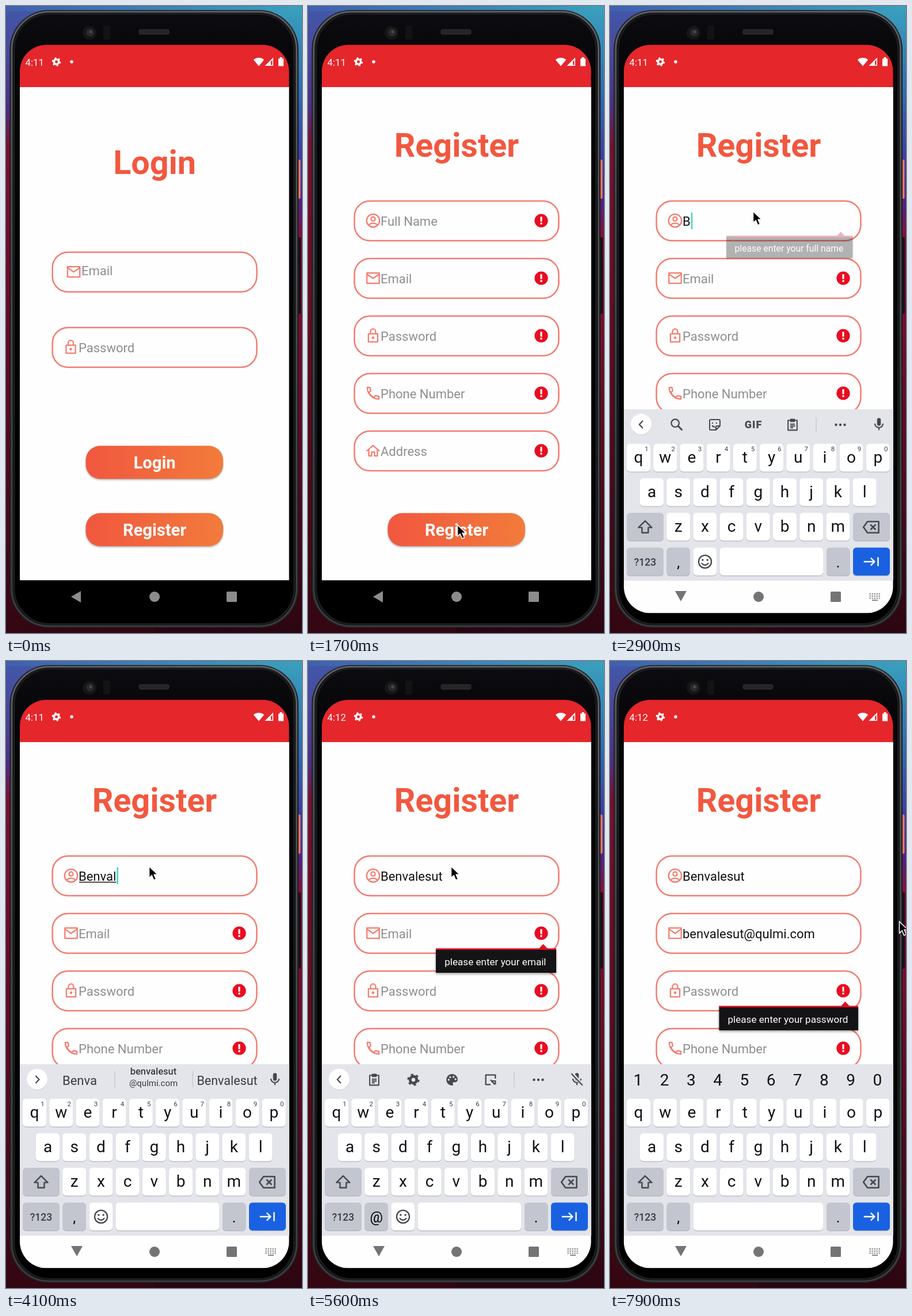
These frames come from a looping animation (514x1090 px, 8 s). An HTML page:

```html
<!DOCTYPE html>
<html lang="en">
<head>
<meta charset="utf-8">
<title>Sign-up walkthrough</title>
<style>
  html, body { margin: 0; width: 100%; height: 100%; overflow: hidden; background: #2e0710; }
  svg { display: block; width: 514px; height: 1090px; font-family: Roboto, Arial, sans-serif; }
  text { white-space: pre; }
  .mid { text-anchor: middle; }
  .title { font-size: 57.4px; font-weight: 700; fill: #f1583f; text-anchor: middle; }
  .btn text { font-size: 29.2px; font-weight: 700; fill: #fff; text-anchor: middle; }
  .btn rect { filter: drop-shadow(0 2px 1.5px rgba(0,0,0,.3)); }
  .btn.down rect { filter: drop-shadow(0 5px 3.5px rgba(0,0,0,.34)); }
  .field { font-size: 22px; }
  .hint { fill: #8e8e90; }
  .value { fill: #111; }
  .key { font-size: 28px; fill: #101114; text-anchor: middle; }
  .sup { font-size: 11.5px; fill: #3c3d42; text-anchor: middle; }
</style>
</head>
<body>
<svg id="stage" viewBox="0 0 514 1090"></svg>
<script>
const LOOP = 8000, STEP = 100;
const NAME = 'Benvalesut', HOST = '@qulmi.com', MAIL = NAME.toLowerCase() + HOST;
const CORAL = '#f17d70', INK = '#46484d', PANEL = '#e3e5ea', GREY_KEY = '#c3c5cf';

const rect = (x, y, w, h, r, fill, extra = '') =>
  `<rect x="${x}" y="${y}" width="${w}" height="${h}" rx="${r}" fill="${fill}" ${extra}/>`;
const dot = (x, y, r, fill = 'currentColor', extra = '') =>
  `<circle cx="${x}" cy="${y}" r="${r}" fill="${fill}" ${extra}/>`;
const path = (d, extra = '') => `<path d="${d}" ${extra}/>`;
const text = (x, y, s, cls = '', extra = '') => `<text x="${x}" y="${y}" class="${cls}" ${extra}>${s}</text>`;
const group = (id, body, extra = '') => `<g id="${id}" ${extra}>${body}</g>`;
const line = (x, y1, y2) => path(`M${x} ${y1}V${y2}`, 'stroke="#c4c6cc" stroke-width="1.3"');
const gradient = (id, dir, stops) => `<linearGradient id="${id}" ${dir}>` +
  stops.map(([o, c]) => `<stop offset="${o}" stop-color="${c}"/>`).join('') + '</linearGradient>';

// Icons live on a 24-unit grid and are mostly stroked.
const solid = 'stroke="none"';
const ICONS = {
  mail: path('M2.5 4h19v16h-19zM3 6l9 6.3L21 6'),
  lock: path('M4.8 9h14.4v12.5H4.8zM8 9V5.5a4 4 0 0 1 8 0V9') + dot(12, 15.2, 2, 'currentColor', solid),
  user: dot(12, 12, 10, 'none') + dot(12, 9.4, 3.2, 'none') + path('M5.3 18.8c3.2-3.9 10.2-3.9 13.4 0'),
  phone: path('M3 3h4.2l1.1 5.2-2.6 2.6a15 15 0 0 0 7.5 7.5l2.6-2.6 5.2 1.1V21A18 18 0 0 1 3 3z'),
  home: path('M2 12.5L12 3.8l10 8.7M5.4 10v10h4.4v-6h4.4v6h4.4V10'),
  gear: dot(12, 12, 6, 'none', 'stroke-width="5"') +
    dot(12, 12, 9.5, 'none', 'stroke-width="3" stroke-dasharray="4.4 5.55"'),
  search: dot(9.5, 9.5, 6, 'none') + path('M14 14l6.5 6.5', 'stroke-width="2.6"'),
  sticker: path('M5 3h14a2 2 0 0 1 2 2v9l-7 7H5a2 2 0 0 1-2-2V5a2 2 0 0 1 2-2zM14 21v-5a2 2 0 0 1 2-2h5M7.5 13c1 2.2 3 3 5 2.5M8 8v2M15 8v2'),
  clip: path('M4.5 4.5h15v16.5h-15zM8 11h8M8 14h8M8 17h5') + rect(8, 2, 8, 5.5, 1, 'currentColor', solid),
  palette: path('M12 2.5a9.5 9.5 0 0 0 0 19c2.6 0 2-2 1.5-3s0-2.5 2-2.5h2.5a4 4 0 0 0 3.5-4.5A9.5 9 0 0 0 12 2.5z', `fill="currentColor" ${solid}`) +
    [[6.5, 12], [9, 7.6], [14.5, 7.2], [18, 11]].map(([x, y]) => dot(x, y, 1.6, PANEL, solid)).join(''),
  resize: path('M20 10V4H4v16h8M20 20v-6h-6M19 20l-7-8', 'stroke-width="2.2"'),
  mic: rect(9, 2, 6, 12.5, 3, 'currentColor', solid) + path('M5.5 11a6.5 6.5 0 0 0 13 0M12 17.5v4'),
  shift: path('M12 3l9.5 9.5h-5V20h-9v-7.5h-5z'),
  erase: path('M7.5 4.5h15v15h-15L2 12zM11.5 8.5l7 7m0-7l-7 7'),
  smile: dot(12, 12, 9.5, 'none') + dot(8.5, 9.5, 1.5, 'currentColor', solid) +
    dot(15.5, 9.5, 1.5, 'currentColor', solid) + path('M7 14c2 4 8 4 10 0'),
  next: path('M1 12h15M11 6.5l5.5 5.5-5.5 5.5M21.5 5.5v13')
};
ICONS.mute = ICONS.mic + path('M4 2.5l17 19', `stroke="${PANEL}" stroke-width="5"`) + path('M3 3l18 19');

const icon = (name, x, y, size, color = INK) =>
  `<g transform="translate(${x} ${y}) scale(${size / 24}) translate(-12 -12)" fill="none" stroke="currentColor" stroke-width="2" color="${color}" stroke-linejoin="round">${ICONS[name]}</g>`;

const box = y => rect(80.6, y, 354.8, 69, 27, '#fffefe', `stroke="${CORAL}" stroke-width="2.5"`);
const button = (id, y, label) =>
  group(id, rect(138.5, y, 238.5, 57.5, 25, 'url(#warm)') + text(258, y + 39.5, label), 'class="btn"');

function formRow([name, hint], i) {
  const y = 339 + 100 * i, mid = y + 34.2;
  return box(y) + icon(name, 113, mid, 27, CORAL) +
    text(126, y + 43, hint, 'field hint', `id="hint${i}"`) + text(126, y + 43, '', 'field value', `id="value${i}"`) +
    group('error' + i, dot(405, mid, 11.6, '#e90c20') +
      rect(403.4, mid - 7, 3.2, 8.5, .5, '#fff') + rect(403.4, mid + 3.3, 3.2, 3.2, .5, '#fff'));
}

const key = (x, y, w, fill = '#fff') =>
  rect(x, y + 1.3, w, 48.5, 6, '#b4b6bf') + rect(x, y, w, 48.5, 6, fill);
const PITCH = 46.2;
const letters = (str, x0, y) => [...str].map((c, i) => {
  const x = x0 + i * PITCH;
  return key(x - 20.5, y, 41) + text(x, y + 33, c, 'key');
}).join('');
const digits = (x0, y, cls) => [...'1234567890'].map((c, i) => text(x0 + i * PITCH, y, c, cls)).join('');

const toggle = d => dot(54, 728, 18, '#c9cbd2') + dot(54, 727, 18, '#fff') +
  path(d, `fill="none" stroke="${INK}" stroke-width="2.2"`);
const LEFT = 'M57 721l-6 6.5 6 6.5', RIGHT = 'M51.5 721l6 6.5-6 6.5';
const more = line(358, 715, 741) + [392.5, 400, 407.5].map(x => dot(x, 728, 2.2, INK)).join('');

const keyboard =
  rect(24, 701, 468, 298, 0, PANEL) +
  group('toolsA', toggle(LEFT) + icon('search', 116, 728, 27) + icon('sticker', 182, 728, 24) +
    text(249, 734, 'GIF', 'mid', `font-size="18" font-weight="900" letter-spacing="1" fill="${INK}"`) +
    icon('clip', 317, 728, 25) + more) +
  group('toolsB', toggle(LEFT) + icon('clip', 115, 728, 25) + icon('gear', 183, 728, 23) +
    icon('palette', 250, 728, 25) + icon('resize', 317, 728, 25) + more) +
  group('suggest', toggle(RIGHT) + text(128, 737, '', 'mid', 'id="typed" font-size="22"') + line(189, 713, 741) +
    text(256, 719, MAIL.slice(0, NAME.length), 'mid', 'font-size="16.5" font-weight="500"') +
    text(256, 739, HOST, 'mid', 'font-size="15"') + line(324, 713, 741) +
    text(384, 737, NAME, 'mid', 'font-size="21.5"'), 'fill="#3a3b40"') +
  group('mic', icon('mic', 467, 727, 26)) + group('mute', icon('mute', 467, 727, 26)) +
  group('numbers', digits(48.5, 738, 'key')) +
  letters('qwertyuiop', 49.5, 761) + group('supers', digits(63.5, 774, 'sup')) +
  letters('asdfghjkl', 72.5, 821) + letters('zxcvbnm', 118.7, 881) +
  key(29, 881, 64, GREY_KEY) + icon('shift', 61, 906, 29) +
  key(422, 881, 64, GREY_KEY) + icon('erase', 453, 906, 31) +
  key(29, 941.5, 64, GREY_KEY) + text(61, 972.5, '?123', 'mid', 'font-size="17.5" font-weight="500" fill="#3a3b40"') +
  key(98.5, 941.5, 40.5, GREY_KEY) + text(118.7, 976, ',', 'mid', 'id="comma" font-size="25"') +
  group('shortSpace', key(144.5, 941.5, 40.5) + icon('smile', 165, 966, 28) + key(190.5, 941.5, 179.5)) +
  group('longSpace', key(144.5, 941.5, 225.5)) +
  key(376, 941.5, 40.5, GREY_KEY) + text(396, 976, '.', 'mid', 'font-size="25"') +
  key(422, 941.5, 64, '#1a61e2') + icon('next', 454, 966, 29, '#fff');

const navDots = [0, 1, 2].map(r => [0, 1, 2, 3, 4].map(c =>
  rect(450.5 + c * 4, 1021 + r * 3.7, 2.3, 2.2, 0, '#8a8a8a')).join('')).join('') +
  rect(455, 1032, 10, 2, 0, '#8a8a8a');

const wallpaper =
  rect(0, 0, 257, 1090, 0, 'url(#wallL)') + rect(257, 0, 257, 1090, 0, 'url(#wallR)') +
  rect(0, 0, 514, 9, 0, 'url(#skyTop)');

const phone =
  rect(506, 267, 5.5, 68, 2, '#ee7763') + rect(506, 402, 6, 133, 2, '#121214') +
  rect(6.5, 7, 501.5, 1074, 68, '#1d1f22') +
  rect(10, 10, 494.5, 1068, 65, '#0b0b0d', 'stroke="url(#rim)" stroke-width="3"') +
  rect(14, 13.5, 486.5, 1061, 62, 'url(#bezel)', 'stroke="#1b1c1f" stroke-width="3"') +
  dot(145, 46.5, 12, '#161617') + dot(146, 46, 7, '#29292c') + dot(147, 45, 2.5, '#4a4a50') +
  rect(169, 34, 12, 24, 2, '#131314') + rect(231, 41, 52, 8, 2.5, '#252427', 'stroke="#343236"');

const status =
  rect(24, 67, 468, 74, 0, '#e5262b') +
  text(33.5, 103.5, '4:11', '', 'id="clock" font-size="16.8" fill="#fff"') +
  icon('gear', 87.5, 97, 17, '#fff') + dot(114, 97, 2.8, '#fff') +
  path('M439 104.5L429.8 93.5a14 14 0 0 1 18.4 0zM464 89.5V104h-14.5zM473 91.5h2.5v-2.5h4v2.5h2.5v13h-9z', 'fill="#fff"') +
  path('M462.5 94v8.5H460v-6z', 'fill="#e5262b"');

const loginPage =
  text(258, 291.5, 'Login', 'title') +
  box(428) + icon('mail', 117.5, 462, 27, CORAL) + text(131, 468, 'Email', 'field hint') +
  box(559) + icon('lock', 112.5, 593, 27, CORAL) + text(126, 602, 'Password', 'field hint') +
  button('go', 764.5, 'Login') + button('join', 881.5, 'Register');

const ROWS = [['user', 'Full Name'], ['mail', 'Email'], ['lock', 'Password'], ['phone', 'Phone Number'], ['home', 'Address']];
const formPage =
  rect(24, 141, 468, 857.5, 0, '#fffeff') + text(258, 262.3, 'Register', 'title') +
  ROWS.map(formRow).join('') +
  path('', 'id="under" stroke="#111" stroke-width="1.5"') +
  rect(0, 0, 2.6, 29, 0, '#3fdcc0', 'id="caret"') + button('send', 881.5, 'Register');

const tooltip =
  rect(0, 400, 0, 42, 0, '#141416', 'id="tipBox" style="filter:drop-shadow(0 2px 2px rgba(0,0,0,.4))"') +
  rect(0, 399.5, 0, 2.6, 0, '#e20e20', 'id="tipEdge"') + path('M401 400l7.5-8 7.5 8z', 'fill="#e20e20"') +
  text(413.5, 429, '', '', 'id="tipText" text-anchor="end" font-size="17.1" fill="#fff"');

const DOWN = 'x2="0" y2="1"';
document.getElementById('stage').innerHTML = `<defs>
  ${gradient('warm', '', [[0, '#f1573f'], [1, '#f27b3b']])}
  ${gradient('skyTop', '', [[0, '#4060ae'], [1, '#3aa0bd']])}
  ${gradient('wallL', DOWN, [[0, '#4258a9'], [.06, '#484b9e'], [.16, '#4b2f86'], [.22, '#78102f'], [.5, '#660a22'], [1, '#330711']])}
  ${gradient('wallR', DOWN, [[0, '#3aa0bd'], [.13, '#2f6fb0'], [.25, '#3d3aa0'], [.32, '#55207a'], [.37, '#860f35'], [.7, '#5a0a20'], [1, '#2a0610']])}
  ${gradient('rim', DOWN, [[0, '#5d6063'], [.3, '#47494c'], [1, '#3a3c3f']])}
  ${gradient('bezel', DOWN, [[0, '#0c0c10'], [.1, '#050507'], [1, '#000']])}
  <clipPath id="glass">${rect(24, 67.5, 467.5, 988, 46, '#000')}</clipPath></defs>` +
  wallpaper + phone +
  `<g clip-path="url(#glass)">` +
    rect(24, 141, 468, 857.5, 0, '#fffeff') +
    group('login', loginPage) + group('form', formPage) + group('tip', tooltip) +
    rect(24, 998.5, 468, 57, 0, '#000', 'id="nav"') +
    group('keys', keyboard) +
    path('M113 1027l17-10v20z', 'id="back" fill="#8c8c8c"') +
    path('M113 1017h20l-10 18z', 'id="hide" fill="#747476"') +
    group('others', dot(258, 1027, 9) + rect(383, 1018, 18, 18, 1.5, 'currentColor')) +
    group('ime', navDots) + status +
  '</g>' +
  path('M-.5 0V20l4.6-4.3 3.5 8.2 4-1.7-3.5-8h6.2z', 'id="mouse" fill="#000" stroke="#fff" stroke-width="1.5"');

const el = {};
document.querySelectorAll('#stage [id]').forEach(n => el[n.id] = n);
const show = (id, on) => el[id].style.display = on ? '' : 'none';
const move = (id, x, y) => el[id].setAttribute('transform', `translate(${x} ${y})`);
const set = (id, attrs) => { for (const a in attrs) el[id].setAttribute(a, attrs[a]); };
const put = (id, s) => { if (el[id].textContent !== s) el[id].textContent = s; };
const ramp = (t, a, b) => Math.min(1, Math.max(0, (t - a) / (b - a)));
const smooth = p => p * p * (3 - 2 * p);

const MOUSE = [[400, 420, 1092], [800, 260, 902], [1900, 260, 902], [2200, 249, 357], [6500, 249, 357],
  [6800, 256, 722], [7080, 256, 722], [7300, 455, 962], [7500, 455, 962], [7800, 503, 453]];

function mouseAt(t) {
  let i = MOUSE.findIndex(k => k[0] > t);
  if (i < 0) return MOUSE[MOUSE.length - 1].slice(1);
  if (i === 0) i = 1;
  const [t0, x0, y0] = MOUSE[i - 1], [t1, x1, y1] = MOUSE[i], p = smooth(ramp(t, t0, t1));
  return [x0 + (x1 - x0) * p, y0 + (y1 - y0) * p];
}

// Each tooltip: appears, starts to leave, row, left edge, message.
const TIPS = [[2200, 2800, 0, 192.5, 'full name'], [5060, 5700, 1, 222, 'email'], [7380, 9000, 2, 189.5, 'password']];
const FOCUS = [2200, 5060, 7380], PICKED = 6900;
const KEY_GAP = [220, 95], KEY_START = [2900, 5800];
const typedCount = (t, row) => t < KEY_START[row] ? 0 : Math.min(NAME.length, 1 + Math.floor((t - KEY_START[row]) / KEY_GAP[row]));

function drawFields(t, row, counts, values) {
  for (let i = 0; i < ROWS.length; i++) {
    const v = values[i] || '';
    put('value' + i, v);
    show('hint' + i, !v);
    show('error' + i, t >= 1600 && !v);
  }
  const width = values[row] ? el['value' + row].getComputedTextLength() : 0;
  const base = 382 + 100 * row;
  const composing = counts[row] > 1 && !(row === 1 && t >= PICKED);
  const lastKey = counts[row] ? KEY_START[row] + (counts[row] - 1) * KEY_GAP[row] : FOCUS[row];
  set('under', { d: composing ? `M127 ${base + 2.5}H${126 + width}` : '' });
  set('caret', { x: 127 + width, y: base - 23 });
  show('caret', t >= FOCUS[0] && (t - lastKey) % 1000 < 500);
}

function drawTip(t) {
  const tip = TIPS.find(k => t >= k[0] && t < k[1] + 200);
  show('tip', tip);
  if (!tip) return;
  const [from, out, row, x, what] = tip, leave = ramp(t, out, out + 200);
  el.tip.style.opacity = t - from < STEP ? .6 : leave ? .64 * (1 - leave) : 1;
  const cx = (x + 431) / 2, cy = 398 + 100 * row;
  set('tip', { transform: `translate(${cx} ${cy}) scale(${1 - .16 * leave}) translate(${-cx} -398)` });
  for (const id of ['tipBox', 'tipEdge']) set(id, { x, width: 431 - x });
  put('tipText', 'please enter your ' + what);
}

function drawKeyboard(t, row, n, value) {
  const rise = smooth(ramp(t, 2400, 2700)), light = rise > .5;
  const suggesting = row === 0 ? t >= 3000 : n > 0;
  show('keys', rise > 0);
  move('keys', 0, 355 * (1 - rise));
  show('toolsA', row === 0 && !suggesting);
  show('toolsB', row === 1 && !suggesting);
  show('suggest', suggesting);
  show('mic', row === 0);
  show('mute', row === 1);
  show('numbers', row === 2);
  show('supers', row < 2);
  show('shortSpace', row < 2);
  show('longSpace', row === 2);
  put('comma', row === 1 ? '@' : ',');
  put('typed', value.slice(0, n < NAME.length ? Math.max(1, n - 1) : n));

  set('nav', { fill: light ? '#fffeff' : '#000' });
  show('back', !light);
  show('hide', light);
  set('others', { color: light ? '#747476' : '#8c8c8c' });
  show('ime', t >= 2300);
}

function draw(t) {
  const row = t < FOCUS[1] ? 0 : t < FOCUS[2] ? 1 : 2;
  const counts = [typedCount(t, 0), typedCount(t, 1), 0];
  const values = [NAME.slice(0, counts[0]), t >= PICKED ? MAIL : MAIL.slice(0, counts[1]), ''];

  const enter = smooth(ramp(t, 1000, 1300));
  show('form', enter > 0);
  el.form.style.opacity = enter;
  move('form', 0, 70 * (1 - enter));
  el.join.classList.toggle('down', t >= 900 && t < 1200);
  el.send.classList.toggle('down', t >= 1500 && t < 1700);

  drawFields(t, row, counts, values);
  drawTip(t);
  drawKeyboard(t, row, counts[row], values[row]);
  put('clock', t < 5000 ? '4:11' : '4:12');
  show('mouse', t >= 400);
  move('mouse', ...mouseAt(t));
}

function tick() {
  draw(Math.floor(performance.now() % LOOP / STEP) * STEP);
  requestAnimationFrame(tick);
}
tick();
</script>
</body>
</html>
```
